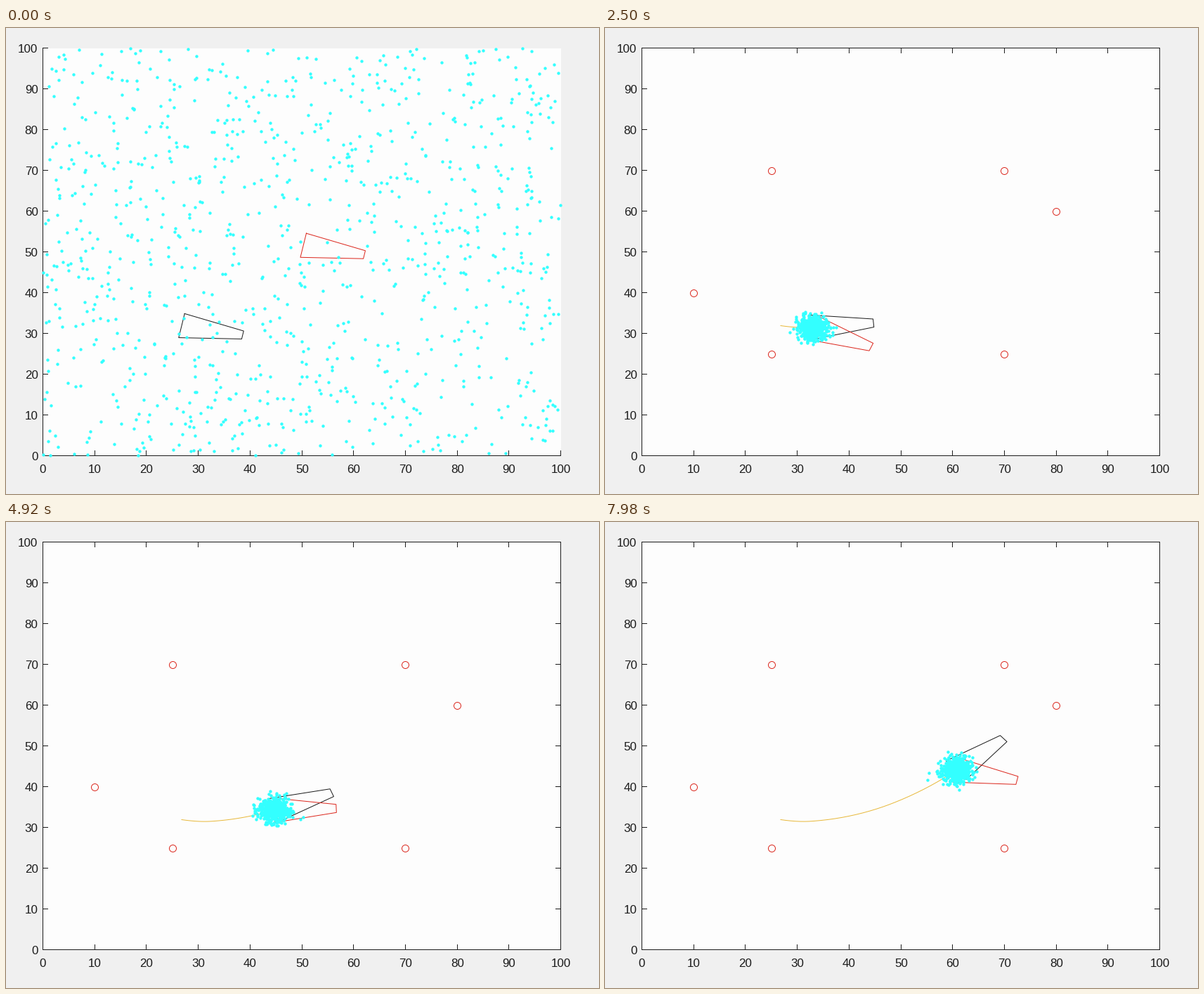
Animation of 844 by 663 pixels, one loop 8 s. Source, as a matplotlib script:

```python
import numpy as np
import matplotlib.pyplot as plt
from matplotlib.animation import FuncAnimation

W, H, DPI = 844, 663, 100
PX = 72 / DPI                       # one pixel in points
LEFT, RIGHT, TOP, BOTTOM = 52.5, 789.5, 28.5, 608.5
LOOP, TICK = 8000, 20
INK, RED, CYAN, GOLD = "#1c1c1c", "#dc281e", "#33ffff", "#e8b93c"
LANDMARKS = np.array([(25, 70), (70, 70), (80, 60), (10, 40), (25, 25), (70, 25)])


def to_px(x, y):
    x, y = np.asarray(x), np.asarray(y)
    return (LEFT + x * (RIGHT - LEFT) / 100,
            BOTTOM - y * (BOTTOM - TOP) / 100)


def step_at(ms):
    """Steps last 20, 20 and 100 ms in turn."""
    cycle, offset = divmod(ms + 20, 140)
    return 3 * cycle + min(offset // 20, 2) - 1


# The vehicle turns at a steady rate; its odometer follows a few key points.
steps = np.arange(step_at(LOOP - TICK) + 1)
heading = -11 + 0.3 * steps
odometer = np.interp(steps, [0, 23, 53, 124, 171], [0, 3.2, 6, 22.3, 37.1])
moved = np.diff(odometer, prepend=0)
true_x = 26.8 + np.cumsum(moved * np.cos(np.radians(heading)))
true_y = 31.9 + np.cumsum(moved * np.sin(np.radians(heading)))

# The estimate closes in on the true position; its heading drifts.
lag = np.exp(-steps / 30)
est_x, est_y = true_x + 2.5 * lag, true_y - 1.5 * lag
est_heading = np.interp(steps, [0, 53, 89, 143, 171], [-34, -22.5, 2, 2.5, -12])


def vehicle(x, y, deg):
    """Tapered outline whose rear centre is at (x, y)."""
    a = np.radians(deg)
    u = np.array([0, 12, 12, 0, 0])
    v = np.array([3, 1, -1, -3, 3])
    return to_px(x + u * np.cos(a) - v * np.sin(a),
                 y + u * np.sin(a) + v * np.cos(a))


fig = plt.figure(figsize=(W / DPI, H / DPI), dpi=DPI, facecolor="#f0f0f0")
ax = fig.add_axes([0, 0, 1, 1])
ax.set_xlim(0, W)
ax.set_ylim(H, 0)
ax.axis("off")
ax.add_patch(plt.Rectangle((LEFT, TOP), RIGHT - LEFT, BOTTOM - TOP,
                           fc="#fdfdfd", ec="none", zorder=0))


def line(xs=(), ys=(), color=INK, z=2, **kw):
    return ax.plot(xs, ys, color=color, lw=PX, zorder=z, snap=False, **kw)[0]


def dots(size, **kw):
    return line(ls="none", marker="o", ms=size * PX, **kw)


def segments(parts):
    """Join separate segments into one line broken by gaps."""
    xs, ys = [], []
    for x0, y0, x1, y1 in parts:
        xs += [x0, x1, np.nan]
        ys += [y0, y1, np.nan]
    return line(xs, ys, solid_capstyle="projecting")


near = [(LEFT, TOP, LEFT, BOTTOM), (LEFT, BOTTOM, RIGHT, BOTTOM)]
far = [(LEFT, TOP, RIGHT, TOP), (RIGHT, TOP, RIGHT, BOTTOM)]
font = dict(family="Liberation Sans", size=17 * PX, color=INK, va="baseline")
for value in range(0, 101, 10):
    x, y = (np.floor(c) + 0.5 for c in to_px(value, value))
    near += [(x, BOTTOM, x, BOTTOM - 7), (LEFT, y, LEFT + 7, y)]
    far += [(x, TOP, x, TOP + 7), (RIGHT, y, RIGHT - 7, y)]
    ax.text(x, 633, str(value), ha="center", **font)
    ax.text(45.5, y + 6.5, str(value), ha="right", **font)

segments(near)
frame_box = segments(far)
marks = dots(10, color=RED, mfc="none", mew=PX)
marks.set_data(*to_px(*LANDMARKS.T))
trail = line(color=GOLD, z=3)
true_car = line(z=4)
est_car = line(color=RED, z=5)
cloud = dots(4.4, color=CYAN, z=6, mew=0)


def draw(i):
    n = step_at(i * TICK)
    rng = np.random.default_rng(400 + n)
    tracking = n > 0
    frame_box.set_visible(tracking)
    marks.set_visible(tracking)

    trail.set_data(*to_px(true_x[:n + 1], true_y[:n + 1]))
    true_car.set_data(*vehicle(true_x[n], true_y[n], heading[n]))
    if tracking:
        pose = est_x[n], est_y[n], est_heading[n]
        spread = 1.5 + 4 * np.exp((1 - n) / 1.5)
        points = rng.normal(pose[:2], spread, (550, 2))
    else:
        pose = 50.3, 51.6, heading[n]
        points = rng.uniform(0, 100, (1000, 2))
    est_car.set_data(*vehicle(*pose))
    cloud.set_data(*to_px(*points.T))
    return trail, true_car, est_car, cloud, frame_box, marks


anim = FuncAnimation(fig, draw, frames=LOOP // TICK, interval=TICK,
                     repeat=True, repeat_delay=0, blit=False)
plt.show()
```
